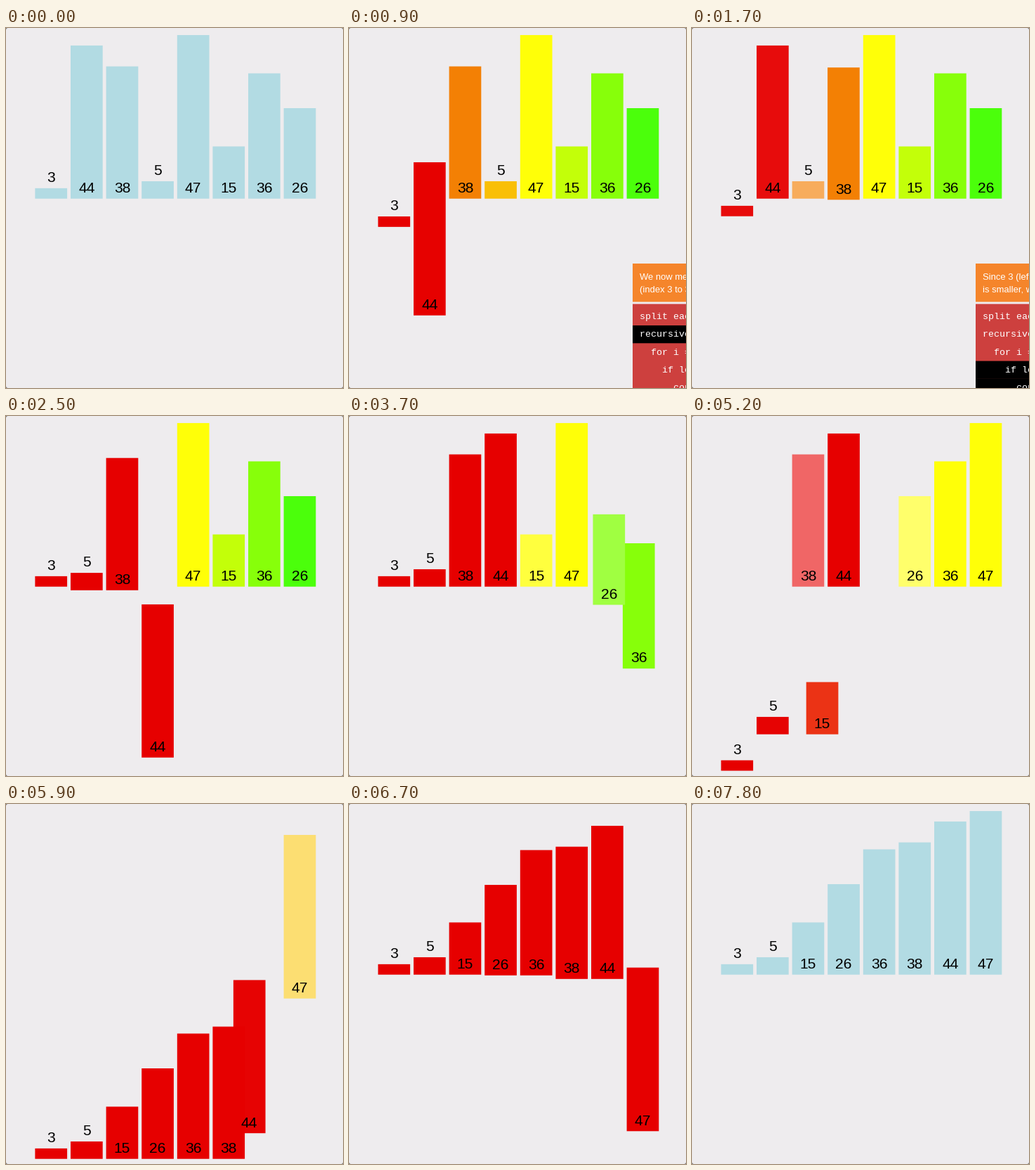
Recreate the animation shown at these times as a matplotlib script. Size 480x512 px, loop 7900 ms.

```python
import numpy as np
import matplotlib.pyplot as plt
from matplotlib.animation import FuncAnimation
from matplotlib.patches import FancyBboxPatch, Rectangle

W, H, DPI = 480, 512, 100
FRAMES, STEP = 79, 100
VALUES = [3, 44, 38, 5, 47, 15, 36, 26]
N = len(VALUES)
BASE, UNIT, DROP = 242.7, 4.95, 262
BAR_W, SLOT0, PITCH = 45.7, 41.4, 50.6
EASE_MS = 400

BG = "#eeecee"
BLUE = np.array([178, 219, 227]) / 255
RED = np.array([230, 0, 0]) / 255
YELLOW = np.array([1, 1, 0.03])
GREEN = np.array([0.06, 1, 0.05])

# Start of each sorting step in ms; some steps fire in bursts.
STEP_K = [0, 4, 5, 6, 17, 18, 19, 26, 27, 28, 29, 30, 31,
          41, 42, 43, 51, 52, 53, 54, 55, 56]
STEP_T = [190, 652, 773, 885, 2168, 2168, 2395, 3207, 3256, 3433, 3508, 3508,
          3705, 4947, 4947, 5205, 6340, 6340, 6372, 6372, 6566, 6690]

CODE = ["split each element into partitions of size 1",
        "recursively merge adjacent partitions",
        "  for i = leftPartIdx to rightPartIdx",
        "    if leftPartHeadValue <= rightPartHeadValue",
        "      copy leftPartHeadValue"]


def ease(u):
    u = min(max(u, 0), 1)
    return 4 * u**3 if u < 0.5 else 1 - 4 * (1 - u)**3


def light(c):
    return (c + 1) / 2


def rainbow(i):
    if i < 4:
        return RED + (YELLOW - RED) * i / 4
    return YELLOW + (GREEN - YELLOW) * (i - 4) / 4


class Track:
    """Value that eases to each new target, interrupting the last move."""

    def __init__(self, value):
        self.start = np.array(value, float)
        self.events = []

    def to(self, t, value):
        self.events.append((t, np.array(value, float)))

    def at(self, t):
        src = dst = self.start
        t0 = 0
        for when, target in self.events:
            if when > t:
                break
            src = src + (dst - src) * ease((when - t0) / EASE_MS)
            dst, t0 = target, when
        return src + (dst - src) * ease((t - t0) / EASE_MS)


def slot(i):
    return SLOT0 + PITCH * i


pos = [Track([slot(i), 0]) for i in range(N)]
paint = [Track(BLUE) for _ in range(N)]
group = [rainbow(i) for i in range(N)]
order = list(range(N))
notes = []
count = 0


def next_step(line1, line2, rows):
    global count
    t = np.interp(count, STEP_K, STEP_T)
    notes.append((t, line1, line2, rows))
    count += 1
    return t


def merge(lo, mid, hi):
    left, right = order[lo:mid], order[mid:hi]
    color = group[left[0]]
    t = next_step("We now merge partitions", f"(index {mid} to {hi - 1})", {1})
    for e in (left[0], right[0]):
        paint[e].to(t, light(group[e]))
    out = []
    while left or right:
        from_left = not right or (left and VALUES[left[0]] <= VALUES[right[0]])
        src = left if from_left else right
        e = src.pop(0)
        side = "left" if from_left else "right"
        t = next_step(f"Since {VALUES[e]} ({side} partition)",
                      "is smaller, we copy it", {3, 4} if from_left else set())
        pos[e].to(t, [slot(lo + len(out)), DROP])
        paint[e].to(t, color)
        out.append(e)
        if left and right:
            paint[src[0]].to(t, light(group[src[0]]))
    for i, e in enumerate(out):
        t = next_step("Copy sorted elements", "back to the array", set())
        pos[e].to(t, [slot(lo + i), 0])
        group[e] = color
    order[lo:hi] = out


def sort(lo, hi):
    if hi - lo > 1:
        mid = (lo + hi) // 2
        sort(lo, mid)
        sort(mid, hi)
        merge(lo, mid, hi)


t = next_step("We split the array into", "partitions of 1 element", {0})
for i in range(N):
    paint[i].to(t, rainbow(i))
sort(0, N)
t = next_step("List is sorted", "", set())
for track in paint:
    track.to(t, BLUE)

fig = plt.figure(figsize=(W / DPI, H / DPI), dpi=DPI, facecolor="#777777")
ax = fig.add_axes([0, 0, 1, 1])
ax.set_xlim(0, W)
ax.set_ylim(H, 0)
ax.axis("off")
ax.add_patch(FancyBboxPatch((0, 0), W, H, fc=BG, ec="none", lw=0, zorder=0,
                            boxstyle="round,pad=0,rounding_size=3"))


def rect(x, y, w, h, color, z):
    return ax.add_patch(Rectangle((x, y), w, h, fc=color, lw=0, zorder=z,
                                  snap=False))


def label(x, y, s, px, font, color, z, ha="left"):
    return ax.text(x, y, s, fontsize=px * 72 / DPI, family=font, color=color,
                   zorder=z, ha=ha, va="baseline")


bars = [rect(0, 0, BAR_W, v * UNIT, BLUE, 1) for v in VALUES]
nums = [label(0, 0, str(v), 21, "Liberation Sans", "black", 2, "center")
        for v in VALUES]

PANEL_X = 404
boxes = [rect(0, 335, 400, 54.5, "#f5852b", 3),
         rect(0, 392.5, 400, 120, "#cd403e", 3)]
marks = [rect(0, 423 + 25.3 * (r - 1), 400, 25.3, "black", 4)
         for r in range(len(CODE))]
status = [label(0, y, "", 13, "Liberation Sans", "white", 5)
          for y in (358, 376)]
lines = [label(0, 414 + 25.3 * r, s, 13.3, "Liberation Mono", "white", 5)
         for r, s in enumerate(CODE)]


def draw_panel(ms):
    shown = ease((ms - 50) / 400) - ease((ms - 1700) / 400)
    x = W + (PANEL_X - W) * shown
    _, line1, line2, rows = [n for n in notes if n[0] <= max(ms, notes[0][0])][-1]
    for box in boxes + marks:
        box.set_x(x)
    for r, mark in enumerate(marks):
        mark.set_visible(r in rows)
    for txt in status + lines:
        txt.set_x(x + 10)
        txt.set_visible(shown > 0)
    status[0].set_text(line1)
    status[1].set_text(line2)


def update(frame):
    ms = frame * STEP
    # the playback slows down near the end
    clock = np.interp(ms, [0, 6700, 7900], [0, 6700, 7240])
    for i, v in enumerate(VALUES):
        x, dy = pos[i].at(clock)
        foot = BASE + dy
        bars[i].set_xy((x, foot - v * UNIT))
        bars[i].set_facecolor(np.clip(paint[i].at(clock), 0, 1))
        inside = v > 10
        base = foot - 8.7 if inside else foot - v * UNIT - 8.7
        nums[i].set_position((x + BAR_W / 2, base))
    draw_panel(ms)
    return bars + nums


anim = FuncAnimation(fig, update, frames=FRAMES, interval=STEP,
                     repeat=True, repeat_delay=0, blit=False)
plt.show()
```
